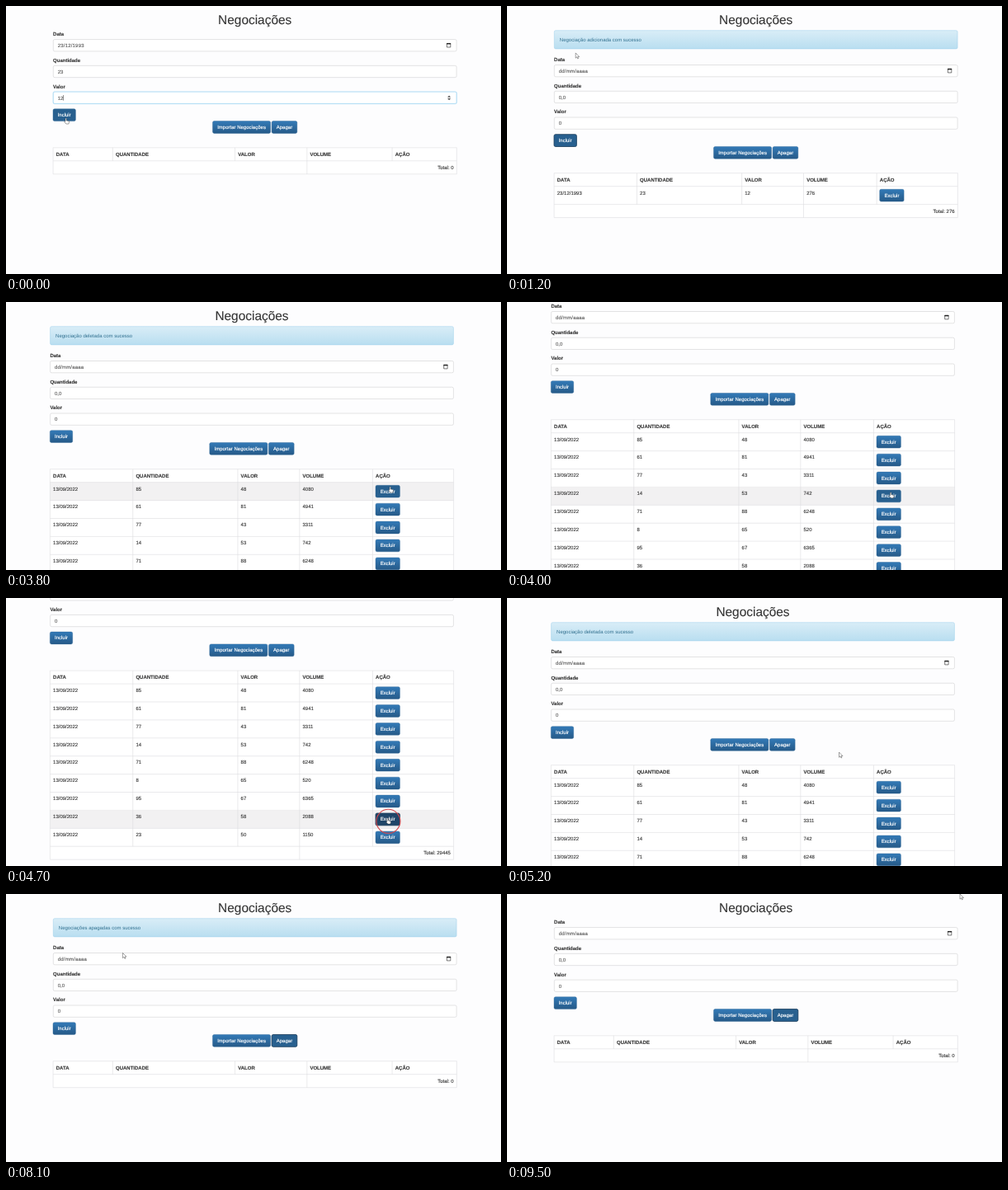
Recreate the animation shown at these times as an HTML page. Size 600x325 px, loop 9600 ms.

```html
<!DOCTYPE html>
<html lang="pt-BR">
<head>
<meta charset="utf-8">
<title>Negociações</title>
<style>
html, body { margin: 0; width: 100%; height: 100%; overflow: hidden; background: #fdfdfe; }
svg { display: block; width: 600px; height: 325px; }
text { font: 6px "Liberation Sans", Arial, sans-serif; fill: #333; stroke: #333; stroke-width: .1; text-rendering: geometricPrecision; white-space: pre; }
.b { font-weight: bold; }
.h { font-size: 15.43px; }
.date { letter-spacing: .2px; }
.field { fill: #555; stroke: #555; }
.alert { fill: #31708f; stroke: none; }
.btn { fill: #fff; stroke: #fff; stroke-width: .16; }
.line { stroke: #dcdcdf; stroke-width: .6; fill: none; }
</style>
</head>
<body>
<svg viewBox="0 0 600 325">
  <defs>
    <linearGradient id="blue" x2="0" y2="1"><stop stop-color="#337ab7"/><stop offset="1" stop-color="#265a88"/></linearGradient>
    <linearGradient id="info" x2="0" y2="1"><stop stop-color="#d9edf7"/><stop offset="1" stop-color="#b9def0"/></linearGradient>
  </defs>
  <g id="page"></g>
  <g id="pointer"></g>
</svg>
<script>
const LOOP = 9600, STEP = 100;
const WIDTH = 489.2, ROW = 21.9, HEAD = 16, BTN = 14.6, PAD = 3.65;
const TITLES = ['DATA', 'QUANTIDADE', 'VALOR', 'VOLUME', 'AÇÃO'];

const added = { date: '23/12/1993', amount: 23, value: 12, from: 300, until: 2900 };
const imported = '85x48 97x61 61x81 77x43 14x53 71x88 8x65 95x67 36x58 23x50'.split(' ').map(pair => {
  const [amount, value] = pair.split('x').map(Number);
  return { date: '13/09/2022', amount, value, from: 2100, until: 7500 };
});
imported[1].until = 3300;
imported[8].until = 4800;
const deals = [added, ...imported];

const EVENTS = [
  { at: 0, focus: 'Valor', message: '' },
  { at: 100, focus: 'Incluir', click: true },
  { at: 300, message: 'Negociação adicionada com sucesso' },
  { at: 1600, focus: 'Importar Negociações', click: true },
  { at: 2100, message: 'Negociações carregadas com sucesso' },
  { at: 2800, focus: '', click: true },
  { at: 2900, message: 'Negociação deletada com sucesso' },
  { at: 3200, click: true },
  { at: 4600, click: true },
  { at: 6800, message: '' },
  { at: 7300, focus: 'Apagar', click: true },
  { at: 7500, message: 'Negociações apagadas com sucesso' },
  { at: 9500, message: '' }
];

// Pointer stops: time, x, y
const STOPS = [
  [0, 72, 136], [300, 72, 136], [1100, 60, 43], [1600, 283, 177], [2000, 470, 219], [2500, 470.5, 204.5],
  [2800, 462, 230], [3200, 462, 252], [3800, 465, 224], [4600, 462, 267], [4800, 462, 267],
  [5200, 402.5, 187], [6800, 333.5, 177], [7300, 338, 149], [7900, 340, 150],
  [8200, 72, 44], [8400, 575, 16], [8500, 575, 16], [8800, 91, 174], [9100, 549, 0], [LOOP, 549, 0]
];

const pen = document.createElement('canvas').getContext('2d');
function textWidth(s, weight = '') {
  pen.font = `${weight} 600px "Liberation Sans", Arial, sans-serif`;
  return pen.measureText(s).width / 100;
}
const buttonWidth = label => textWidth(label) + 11.2;

// Columns share the table width in proportion to their widest content.
function columns(filled) {
  const widths = TITLES.map(s => textWidth(s, 'bold') + 2 * PAD);
  if (filled) {
    widths[0] = textWidth(added.date) + 2 * PAD;
    widths[4] = buttonWidth('Excluir') + 2 * PAD;
  }
  const sum = widths.reduce((a, b) => a + b);
  let x = 0;
  return widths.map(w => (x += w) - w).map(v => v * WIDTH / sum);
}
const COLS = { empty: columns(false), full: columns(true) };

function ease(t, from, to) {
  const p = Math.min(1, Math.max(0, (t - from) / (to - from)));
  return p * p * (3 - 2 * p);
}

function pointerAt(t) {
  const i = STOPS.findIndex(s => s[0] > t), [t0, x0, y0] = STOPS[i - 1], [t1, x1, y1] = STOPS[i];
  const p = ease(t, t0, t1);
  return [x0 + (x1 - x0) * p, y0 + (y1 - y0) * p];
}

const stateAt = t => Object.assign({}, ...EVENTS.filter(e => e.at <= t));
const clickAge = t => t - (EVENTS.find(e => e.click && t >= e.at && t < e.at + 300) || { at: Infinity }).at;

const text = (x, y, s, cls = '', anchor = 'start') =>
  `<text x="${x}" y="${y}" class="${cls}" text-anchor="${anchor}">${s}</text>`;
const box = (x, y, w, h, attrs) => `<rect x="${x}" y="${y}" width="${w}" height="${h}" ${attrs}/>`;
const line = d => `<path class="line" d="${d}"/>`;

function draw(t) {
  const { message, focus } = stateAt(t);
  const rows = deals.filter(d => t >= d.from && t < d.until);
  const pressed = clickAge(t) >= 0;
  const left = rows.length > 1 ? 53.4 : 57.1, right = left + WIDTH, mid = left + WIDTH / 2;
  const shift = message ? 30.9 : 0;
  const tableTop = 171.8 + shift, bodyTop = tableTop + HEAD;
  const footTop = bodyTop + rows.length * ROW, bottom = footTop + HEAD;
  const wanted = 120 * (ease(t, 3700, 4300) - ease(t, 4900, 5200));
  const scroll = t < 3900 ? 0 : Math.min(wanted, Math.max(0, bottom + 7.8 - 325));
  const [px, py] = pointerAt(t), my = py + scroll;
  let out = '', hand = false;

  function button(x, cy, label) {
    const y = cy - BTN / 2, w = buttonWidth(label);
    const over = px >= x && px <= x + w && my >= y && my <= y + BTN;
    const focused = focus === label, dark = focused || over && pressed;
    const fill = over && pressed ? '#1f4568' : over || focused ? '#28608f' : 'url(#blue)';
    hand = hand || over;
    out += box(x - .1, y - .1, w + .2, BTN + .2,
      `rx="1.8" fill="${fill}" stroke="${dark ? '#173a59' : '#2d6293'}" stroke-width="${dark ? .8 : .4}"`);
    out += text(x + w / 2, cy + 2, label, 'btn', 'middle');
  }

  function input(index, label, value) {
    const y = shift + 31.75 * index, active = focus === label;
    out += text(left, y + 36, label, 'b');
    if (active) out += box(left - .6, y + 40, WIDTH + 1.2, 15.8, 'rx="2.2" fill="#dceffa"');
    out += box(left + .2, y + 40.6, WIDTH - .4, BTN - .3,
      `rx="1.7" fill="#fff" stroke="${active ? '#86c9ee' : '#d0d0d2'}" stroke-width=".6"`);
    out += text(left + 5.6, y + 50, value, index ? 'field' : 'field date');
    if (active) {
      out += box(left + 12.4, y + 44.5, .5, 6.6, 'fill="#222"');
      out += `<path d="M${left + 478} ${y + 47.2}l2-2.3 2 2.3zm0 1.3l2 2.3 2-2.3z" fill="#555"/>`;
    }
  }

  out += text(mid, 22.1, 'Negociações', 'h', 'middle');
  if (message) {
    out += box(left + .2, 29.7, WIDTH - .4, 22.2, 'rx="1.7" fill="url(#info)" stroke="#9acfea" stroke-width=".5"');
    out += text(left + 6.7, 43, message, 'alert');
  }

  const typed = t < added.from;
  input(0, 'Data', typed ? added.date : 'dd/mm/aaaa');
  input(1, 'Quantidade', typed ? added.amount : '0,0');
  input(2, 'Valor', typed ? added.value : '0');
  const cal = shift + 45.4;
  out += `<path d="M${left + 477.3} ${cal}h4.4v4.6h-4.4z" fill="none" stroke="#222" stroke-width=".6"/>`
    + box(left + 477, cal - .4, 5, 1.4, 'fill="#222"');

  const actions = mid - 51.1;
  button(left, 132.2 + shift, 'Incluir');
  button(actions, 147 + shift, 'Importar Negociações');
  button(actions + buttonWidth('Importar Negociações') + 1.7, 147 + shift, 'Apagar');

  const cols = rows.length ? COLS.full : COLS.empty;
  const cell = (i, y, s, cls) => text(left + cols[i] + PAD, y, s, cls);
  out += box(left, tableTop, WIDTH, bottom - tableTop, 'fill="#fff"');
  TITLES.forEach((s, i) => { out += cell(i, tableTop + 10, s, 'b'); });

  rows.forEach(({ date, amount, value }, i) => {
    const y = bodyTop + i * ROW;
    if (my >= y && my < y + ROW && px > left && px < right) out += box(left, y, WIDTH, ROW, 'fill="#f2f1f2"');
    [date, amount, value, amount * value].forEach((s, n) => { out += cell(n, y + 9.8, s); });
    button(left + cols[4] + PAD, y + 11, 'Excluir');
    out += line(`M${left} ${y + ROW}H${right}`);
  });

  const total = rows.reduce((sum, { amount, value }) => sum + amount * value, 0);
  out += text(right - PAD, footTop + 9.9, 'Total: ' + total, '', 'end');
  out += line(`M${left} ${tableTop}H${right}V${bottom}H${left}zM${left} ${bodyTop}H${right}`);
  cols.slice(1).forEach((c, i) => {
    out += line(`M${left + c} ${tableTop}V${i === 2 ? bottom : footTop}`);
  });

  page.setAttribute('transform', `translate(0 ${-scroll})`);
  page.innerHTML = out;
  pointer.innerHTML = ripple(clickAge(t), px, py) + cursor(px, py, hand);
}

function ripple(age, x, y) {
  if (age < 0) return '';
  const r = 5 + 9.5 * Math.min(1, age / 100);
  return `<circle cx="${x + 1.4}" cy="${y + 3.8}" r="${r}" fill="none" stroke="#d4484c"
    stroke-width="1.1" opacity="${age > 100 ? .5 : 1}"/>`;
}

function cursor(x, y, hand) {
  const d = hand
    ? 'M0 .6Q.7-.5 1.3.6V2.9l2.5.6Q4.6 3.8 4.5 4.8L3.9 7H.9L-1.2 4.5Q-1.1 3.5 0 4.2z'
    : 'M0 0V6.2L1.5 4.9 2.5 7 3.4 6.6 2.5 4.6H4.5z';
  return `<path transform="translate(${x} ${y})" d="${d}" fill="#fff" stroke="#333" stroke-width=".45"/>`;
}

const page = document.getElementById('page'), pointer = document.getElementById('pointer');
let shown = -1;
function tick() {
  const t = Math.floor(performance.now() % LOOP / STEP) * STEP;
  if (t !== shown) draw(shown = t);
  requestAnimationFrame(tick);
}
tick();
</script>
</body>
</html>
```
